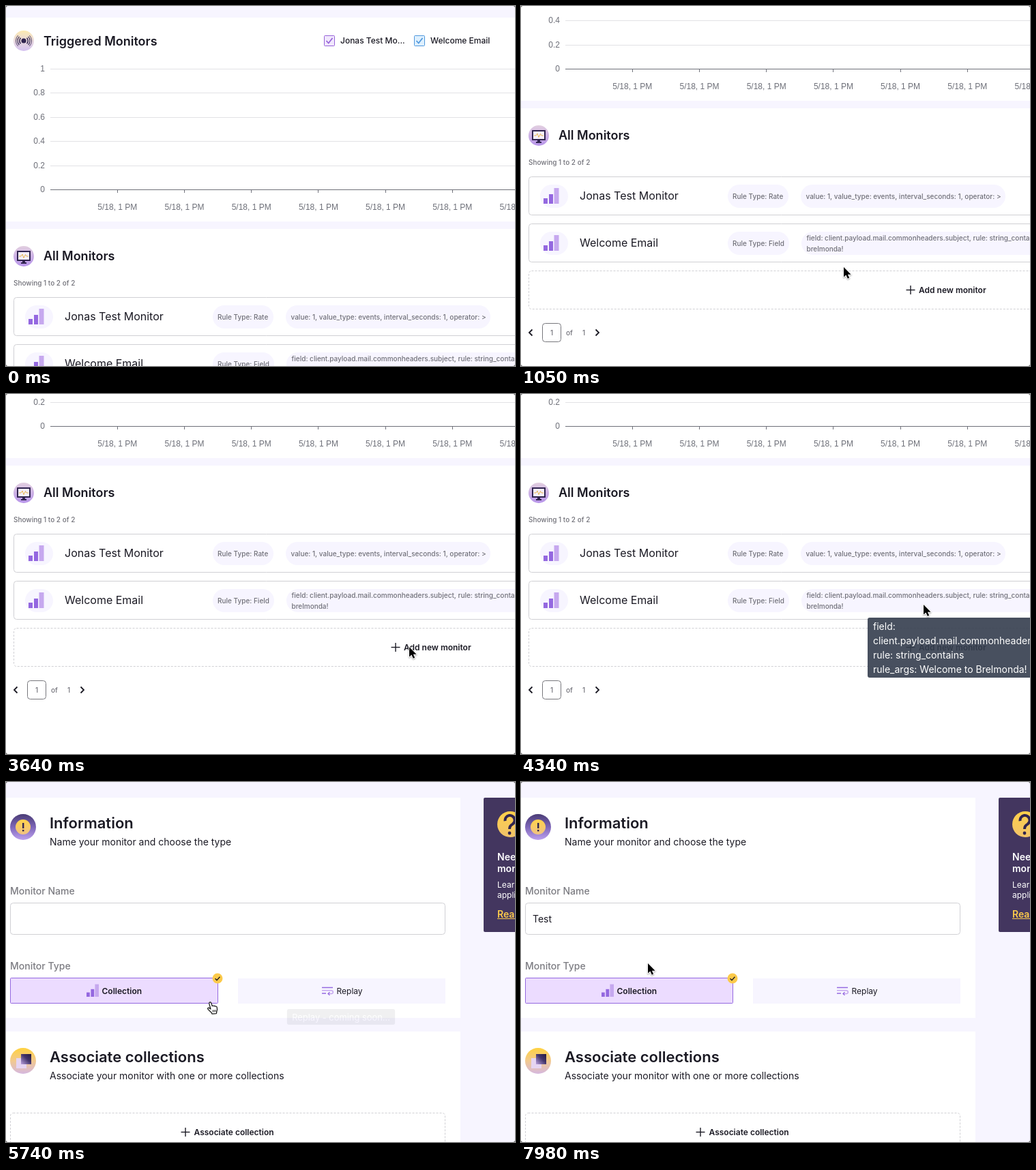
Write an HTML page with a canvas that moves like this. It is 746 px wide and 528 px high and loops after 8000 ms.

```html
<!DOCTYPE html>
<html lang="en">
<head>
<meta charset="utf-8">
<title>Monitors</title>
<style>
html, body { margin: 0; width: 100%; height: 100%; overflow: hidden; background: #fff; }
canvas { display: block; }
</style>
</head>
<body>
<canvas id="stage" width="746" height="528"></canvas>
<script>
const W = 746, H = 528, LOOP = 8000, STEP = 70, PAGE_CUT = 5040;
const INK = '#1b1a24', GREY = '#707078', LILAC = '#f7f5ff', EDGE = '#d0d0d4';
const PURPLE = '#9468e0', PALE = '#c6a8ef', NIGHT = '#30244f', YELLOW = '#fcca4b';

const stage = document.getElementById('stage').getContext('2d');
const layer = document.createElement('canvas');
layer.width = W;
layer.height = H;
const layerCtx = layer.getContext('2d');
let c = stage;

// ---- drawing helpers ----
function rect(x, y, w, h, fill) {
  c.fillStyle = fill;
  c.fillRect(x, y, w, h);
}

function box(x, y, w, h, r, fill, stroke, dash) {
  c.beginPath();
  c.roundRect(x, y, w, h, r);
  if (fill) { c.fillStyle = fill; c.fill(); }
  if (stroke) {
    c.lineWidth = 1;
    c.strokeStyle = stroke;
    c.setLineDash(dash || []);
    c.stroke();
    c.setLineDash([]);
  }
}

// y is the middle of the capitals
function text(s, x, y, size, weight = 400, fill = INK, align = 'left') {
  c.font = `${weight} ${size}px Inter, sans-serif`;
  c.textAlign = align;
  c.textBaseline = 'alphabetic';
  c.fillStyle = fill;
  c.fillText(s, x, Math.round(y + size * 0.36));
}

function line(points, color, width) {
  c.beginPath();
  points.forEach(([x, y]) => c.lineTo(x, y));
  c.strokeStyle = color;
  c.lineWidth = width;
  c.stroke();
}

function disc(x, y, r, ...colors) {
  const g = c.createLinearGradient(0, y - r, 0, y + r);
  colors.forEach((col, i) => g.addColorStop(colors.length > 1 ? i / (colors.length - 1) : 0, col));
  c.beginPath();
  c.arc(x, y, r, 0, 7);
  c.fillStyle = g;
  c.fill();
}

function plus(x, y) {
  line([[x - 6.5, y], [x + 6.5, y]], INK, 1.4);
  line([[x, y - 6.5], [x, y + 6.5]], INK, 1.4);
}

function bars(x, base, k) {
  rect(x, base - 8 * k, 6 * k, 8 * k, PURPLE);
  rect(x + 8 * k, base - 14 * k, 6 * k, 14 * k, PURPLE);
  rect(x + 15.5 * k, base - 23 * k, 7 * k, 23 * k, PALE);
}

// ---- monitor list page ----
function checkbox(x, edge, fill) {
  box(x + .5, 43.5, 15, 15, 1, fill, edge);
  line([[x + 3.5, 51], [x + 6.7, 54.5], [x + 12.5, 47]], edge, 1.7);
}

function signalIcon() {
  disc(26, 51, 15, '#fdeab0', '#e8d8dd', '#d3c0f0');
  disc(26, 51, 3.6, NIGHT);
  c.strokeStyle = NIGHT;
  for (const [r, w] of [[6.2, 1.5], [9, 1.1], [11.5, .8]]) {
    c.lineWidth = w;
    for (const a of [0, Math.PI]) {
      c.beginPath();
      c.arc(26, 51, r, a - .75, a + .75);
      c.stroke();
    }
  }
}

function screenIcon() {
  disc(26, 367, 15, '#e2cfe0', '#b794ea');
  rect(16, 359, 20, 15, NIGHT);
  rect(18, 361, 16, 11, '#f5effc');
  rect(24, 374, 4, 2, NIGHT);
  rect(22, 376, 8, 2, NIGHT);
  line([[19, 367], [22, 367], [24, 364], [26, 369.5], [28.5, 364.5], [30, 367], [33, 367]], '#e8b64c', 1);
}

function card(y, name, type, typeW) {
  box(11.5, y + .5, 1000, 56, 4, '#fff', EDGE);
  box(28, y + 12, 41, 34, 17, LILAC);
  bars(33, y + 40, 1);
  text(name, 86, y + 28.4, 16);
  box(303, y + 12, typeW, 34, 17, LILAC);
  text('Rule Type: ' + type, 310, y + 29.6, 10, 500, GREY);
}

function chart() {
  c.font = '12px "Liberation Sans", Arial, sans-serif';
  c.textBaseline = 'middle';
  for (let i = 0; i < 6; i++) {
    const y = Math.round(92 + i * 35.4);
    rect(65, y, W, 1, i < 5 ? '#e2e2e5' : '#6e7079');
    c.fillStyle = '#6e7079';
    c.textAlign = 'right';
    c.fillText(['1', '0.8', '0.6', '0.4', '0.2', '0'][i], 57, y + .5);
  }
  c.textAlign = 'center';
  for (let i = 0; i < 7; i++) {
    const x = 163.3 + i * 98.2;
    rect(Math.floor(x), 270, 1, 4, '#6e7079');
    c.fillText('5/18, 1 PM', x, 295.5);
  }
}

function listPage(scroll) {
  rect(0, 0, W, H, '#fff');
  c.save();
  c.translate(0, -scroll);
  rect(0, 0, W, 17, LILAC);
  signalIcon();
  text('Triggered Monitors', 55, 51.3, 18, 600);
  checkbox(466, '#9562d8', '#f1e7fd');
  text('Jonas Test Mo...', 490, 51, 12, 500);
  checkbox(598, '#4f97dc', '#def0ff');
  text('Welcome Email', 622, 51, 12, 500);
  chart();

  rect(0, 316, W, 11, LILAC);
  screenIcon();
  text('All Monitors', 55, 366.5, 18, 600);
  text('Showing 1 to 2 of 2', 11, 406.5, 10, 500, GREY);

  card(427, 'Jonas Test Monitor', 'Rate', 89);
  box(410, 439, 300, 34, 17, LILAC);
  text('value: 1, value_type: events, interval_seconds: 1, operator: >', 417.5, 456.6, 10, 500, GREY);

  card(496, 'Welcome Email', 'Field', 90);
  box(411, 508, 496, 34, 17, LILAC);
  text('field: client.payload.mail.commonheaders.subject, rule: string_contains, rule_args: Welcome to',
    418.5, 517.6, 10, 500, GREY);
  text('brelmonda!', 418.5, 533.6, 10, 500, GREY);

  box(11.5, 565.5, 1000, 56, 4, null, EDGE, [3, 2]);
  plus(571, 593.5);
  text('Add new monitor', 583, 593.5, 12, 600);

  line([[16.5, 651.5], [12, 656], [16.5, 660.5]], INK, 1.8);
  box(31.5, 642.5, 27, 27, 4, null, '#77777c');
  text('1', 45, 656.4, 10, 500, GREY, 'center');
  text('of', 66, 656.4, 10, 500, GREY);
  text('1', 92, 656.4, 10, 500, GREY, 'center');
  line([[109.5, 651.5], [114, 656], [109.5, 660.5]], INK, 1.8);
  c.restore();
}

// ---- new monitor page ----
function replayIcon() {
  line([[463, 301.5], [479, 301.5]], PURPLE, 1.5);
  line([[463, 310], [469, 310]], PURPLE, 1.5);
  c.beginPath();
  c.moveTo(463, 305.8);
  c.lineTo(476, 305.8);
  c.bezierCurveTo(480.5, 305.8, 480.5, 310.5, 476, 310.5);
  c.lineTo(472.5, 310.5);
  c.strokeStyle = PALE;
  c.stroke();
  line([[474.5, 308.2], [472, 310.5], [474.5, 312.8]], PURPLE, 1.3);
}

function helpPanel() {
  box(700, 23, 80, 197, 2, '#43365f');
  disc(739, 62, 19, '#ffd04a', '#f1c36a');
  c.strokeStyle = NIGHT;
  c.lineWidth = 4;
  c.beginPath();
  c.arc(738.5, 56, 7, Math.PI * .95, Math.PI * 2.3);
  c.quadraticCurveTo(738, 64, 738, 69);
  c.stroke();
  disc(738, 75, 2.4, NIGHT);
  text('Need more', 720, 110, 14, 600, '#fff');
  text('monitors?', 720, 127, 14, 600, '#fff');
  text('Learn how', 720, 151, 12, 400, '#fff');
  text('applied', 720, 166, 12, 400, '#fff');
  text('Read more', 720, 194, 14, 600, YELLOW);
  rect(720, 200, 60, 1, YELLOW);
}

function formPage(typed, caret) {
  rect(0, 0, W, H, LILAC);
  rect(0, 23, 666, 323, '#fff');
  rect(0, 366, 666, 162, '#fff');

  disc(25, 66, 19, '#4a3c75', '#7d66b8', '#bca0ee');
  disc(25, 66, 11, '#ffd24a', '#f0c283');
  rect(24, 60, 2.4, 8, NIGHT);
  rect(24, 70, 2.4, 2.4, NIGHT);
  text('Information', 64, 60.4, 22, 600);
  text('Name your monitor and choose the type', 64, 88, 14);

  text('Monitor Name', 6, 160, 14, 500, '#7c7c82');
  box(6.5, 177.5, 637, 46, 4, '#fff', EDGE);
  text(typed, 17, 201, 14);
  if (caret) rect(17 + Math.round(c.measureText(typed).width), 193, 1, 16, INK);

  text('Monitor Type', 6, 270, 14, 500, '#7c7c82');
  box(6.5, 287.5, 304, 37, 1, '#ecdcff', PURPLE);
  bars(118, 315, .8);
  text('Collection', 140.5, 307, 12, 600);
  disc(310, 288, 7.5, YELLOW);
  line([[306.5, 288.3], [309, 290.8], [313.5, 285.8]], INK, 1.3);
  rect(340, 288, 304, 37, LILAC);
  replayIcon();
  text('Replay', 484.5, 307, 12);

  disc(25, 409, 19, '#ffd23f', '#f2c98f', '#d5b8e0');
  rect(15, 405, 15, 15, '#e6d5f2');
  const g = c.createLinearGradient(22, 414, 37, 399);
  g.addColorStop(0, '#b9a0dd');
  g.addColorStop(.55, '#43356b');
  g.addColorStop(1, '#251a40');
  rect(22, 399, 15, 15, g);
  text('Associate collections', 64, 403.4, 22, 600);
  text('Associate your monitor with one or more collections', 64, 431, 14);
  box(6.5, 485.5, 637, 60, 4, null, EDGE, [3, 2]);
  plus(263, 513.5);
  text('Associate collection', 275.5, 513.5, 12, 600);

  helpPanel();
}

// ---- tooltip, flattened before it is faded ----
function tooltip(lines, x, y, w, alpha) {
  if (alpha <= 0) return;
  const k = Math.max(.92, .89 + .11 * alpha / .9);
  c = layerCtx;
  c.clearRect(0, 0, W, H);
  c.save();
  c.translate(x + w / 2, y);
  c.scale(k, k);
  box(-w / 2, 0, w, lines.length * 21 + 4, 3, '#353e4e');
  lines.forEach((s, i) => text(s, 8 - w / 2, 13 + i * 21, 14, 400, '#fff'));
  c.restore();
  c = stage;
  c.globalAlpha = alpha;
  c.drawImage(layer, 0, 0);
  c.globalAlpha = 1;
}

// ---- pointer ----
const ARROW = new Path2D('M0 0V14.6L3.4 11.5L5.8 16.8L8.2 15.7L5.9 10.7H10.6Z');
const HAND = new Path2D('M5.2 11.2L3 3.2Q2.7 1.2 4.2 .9Q5.6 .7 6.1 2.4L7.4 6.6Q8.4 5.4 9.8 6.7' +
  'Q11 5.7 12.2 7.1Q14 6.6 14.4 8.6Q15.2 11.6 14 14.4L13.6 17.5L7.2 18L6.6 16.4' +
  'Q3.6 13.6 1 10.8Q.4 9.6 1.6 9.2Q3 9 5.2 11.2Z');
const KNUCKLES = new Path2D('M8.4 12.4V15.4M10.3 12.3V15.4M12.2 12.2V15.2');
const BEAM = new Path2D('M-3 -8Q0 -8 0 -6V6Q0 8 -3 8M3 -8Q0 -8 0 -6M0 6Q0 8 3 8');

function stroke(path, color, width) {
  c.strokeStyle = color;
  c.lineWidth = width;
  c.stroke(path);
}

function pointer(kind, x, y) {
  c.save();
  c.lineJoin = 'round';
  c.translate(x, y);
  if (kind === 'beam') {
    stroke(BEAM, '#fff', 2.6);
    stroke(BEAM, '#111', 1.1);
  } else {
    c.shadowColor = 'rgba(0,0,0,.35)';
    c.shadowBlur = 2;
    c.shadowOffsetY = 1;
    if (kind === 'hand') {
      c.translate(-4.2, -1);
      c.fillStyle = '#fff';
      c.fill(HAND);
      c.shadowColor = 'transparent';
      stroke(HAND, '#111', 1.2);
      stroke(KNUCKLES, '#111', .9);
    } else {
      stroke(ARROW, '#fff', 2);
      c.shadowColor = 'transparent';
      c.fillStyle = '#000';
      c.fill(ARROW);
    }
  }
  c.restore();
}

// ---- timing ----
const SCROLL = [[770, 0], [840, 10], [910, 55], [980, 118], [1050, 177], [1120, 211], [1190, 222]];
const TIP_FIELD = [[4060, 0], [4270, .9], [4550, .9], [4690, .25], [4760, 0]];
const TIP_REPLAY = [[5180, 0], [5320, .9], [5530, .9], [5600, .5], [5670, .22], [5740, .07], [5810, 0]];
const MOVES = [
  [840, 473, 383], [1260, 473, 383], [1960, 592, 367], [2170, 592, 367], [2310, 592, 373],
  [2660, 592, 373], [2800, 591, 372], [3080, 591, 372], [3290, 592, 371], [3570, 592, 371],
  [3640, 591, 371], [3850, 591, 371], [4340, 590, 309], [4480, 590, 311], [4690, 578, 345],
  [4970, 572, 352], [5250, 525, 318], [5530, 352, 316], [5740, 299, 323], [6370, 155, 207],
  [6440, 156, 199], [7490, 156, 199], [7980, 186, 266]
];

function span(keys, t) {
  let i = 0;
  while (i < keys.length - 2 && t >= keys[i + 1][0]) i++;
  const u = (t - keys[i][0]) / (keys[i + 1][0] - keys[i][0]);
  return [i, Math.min(1, Math.max(0, u))];
}

function ramp(keys, t) {
  const [i, u] = span(keys, t);
  return keys[i][1] + (keys[i + 1][1] - keys[i][1]) * u;
}

// slope at a key; flat where the path stops or turns back
function slope(i, d) {
  const a = MOVES[i - 1], b = MOVES[i], e = MOVES[i + 1];
  if (!a || !e || (b[d] - a[d]) * (e[d] - b[d]) <= 0) return 0;
  return (e[d] - a[d]) / (e[0] - a[0]);
}

function place(t, d) {
  const [i, u] = span(MOVES, t);
  const p = MOVES[i], q = MOVES[i + 1], dt = q[0] - p[0], v = 1 - u;
  return p[d] * v * v * (1 + 2 * u) + q[d] * u * u * (3 - 2 * u) +
    dt * u * v * (v * slope(i, d) - u * slope(i + 1, d));
}

function pointerKind(t, x, y) {
  if (t < PAGE_CUT) return t > 4600 && y > 343 ? 'hand' : 'arrow';
  if (y > 178 && y < 224) return 'beam';
  return x < 311 && y > 287 && y < 326 ? 'hand' : 'arrow';
}

function draw(t) {
  if (t < PAGE_CUT) {
    listPage(ramp(SCROLL, t));
    tooltip(['field:', 'client.payload.mail.commonheaders.subject', 'rule: string_contains',
      'rule_args: Welcome to Brelmonda!'], 508, 328, 300, ramp(TIP_FIELD, t));
  } else {
    const count = t < 6720 ? 0 : Math.min(4, 1 + Math.floor((t - 6720) / 140));
    const caret = (t >= 6300 && t < 7350) || (t >= 7840 && t < 7980);
    formPage('Test'.slice(0, count), caret);
    tooltip(['Replay - coming soon...'], 405, 333, 172, ramp(TIP_REPLAY, t));
  }

  const typing = t >= 6720 && t < 7560;
  if (t >= 840 && !typing) {
    const x = place(t, 1), y = place(t, 2);
    pointer(pointerKind(t, x, y), x, y);
  }

  // rounded window corners
  c.beginPath();
  c.rect(0, 0, W, H);
  c.roundRect(0, 0, W, H, 3);
  c.fillStyle = '#555';
  c.fill('evenodd');
}

const start = performance.now();
function tick() {
  const t = Math.max(0, performance.now() - start) % LOOP;
  draw(Math.floor(t / STEP) * STEP);
  requestAnimationFrame(tick);
}
tick();
</script>
</body>
</html>
```
